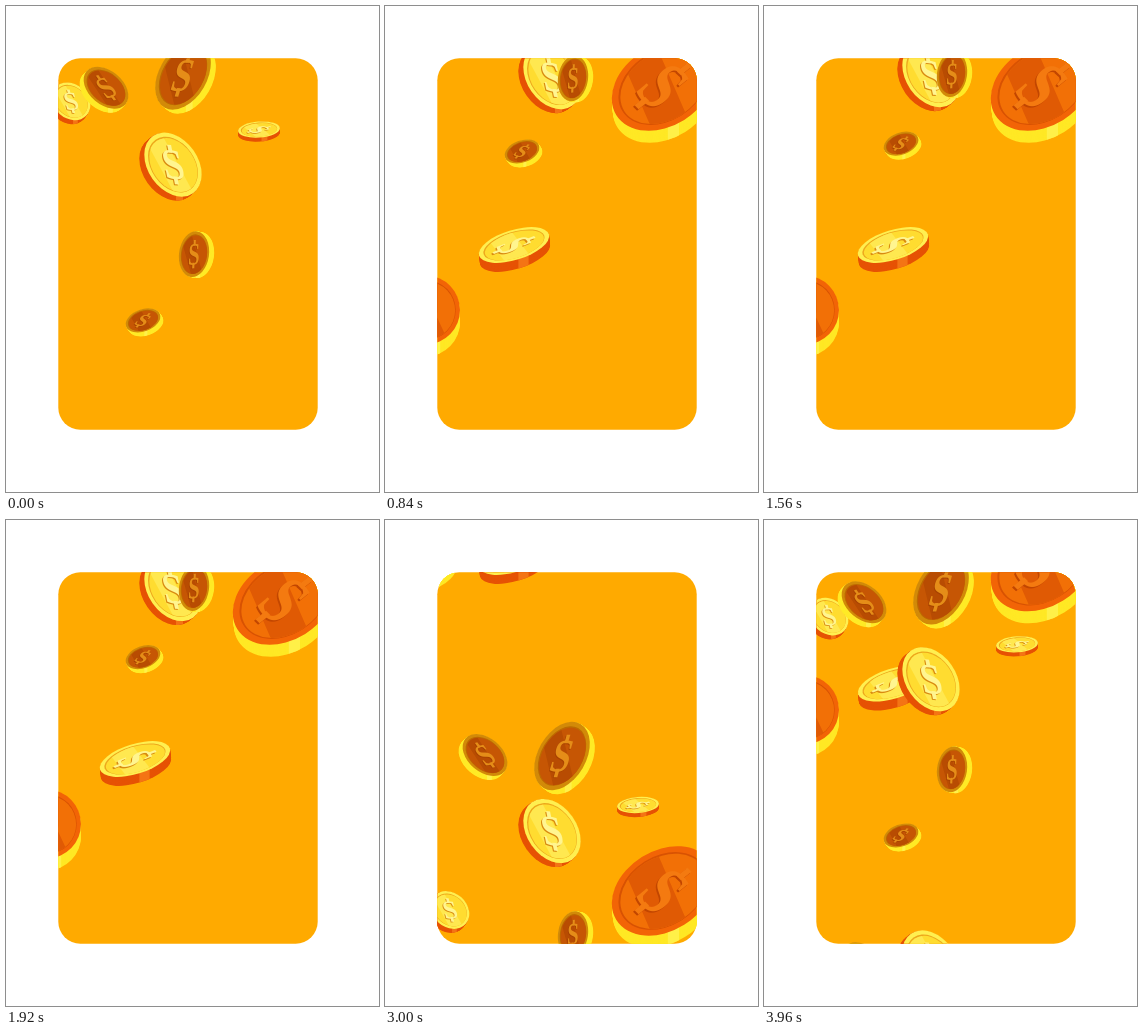
An HTML page with a canvas that plays this animation: 373x486 px, repeating every 4 s.

```html
<!DOCTYPE html>
<html lang="en">
<head>
<meta charset="utf-8">
<title>Drifting coins</title>
<style>
  html, body { margin: 0; width: 100%; height: 100%; overflow: hidden; background: #fff; }
  canvas { display: block; }
</style>
</head>
<body>
<canvas id="stage"></canvas>
<script>
const W = 373, H = 486, LOOP = 4000;
const canvas = document.getElementById('stage');
const ctx = canvas.getContext('2d');
const ratio = window.devicePixelRatio || 1;
canvas.width = W * ratio;
canvas.height = H * ratio;
canvas.style.width = W + 'px';
canvas.style.height = H + 'px';

const palettes = {
  gold: { side: '#e65204', glint: '#f47414', rim: '#ffef50', line: '#eda81c', inner: '#ffdc30', band: '#ffe850', sign: '#fff590', shade: '#d98a10' },
  dark: { side: '#ffea26', glint: '#fff04a', rim: '#d28a08', line: '#bd6a00', inner: '#c65604', band: '#b84c02', sign: '#e58d18', shade: '#a84200' },
  fire: { side: '#ffe824', glint: '#fff048', rim: '#f26406', line: '#d85202', inner: '#f27006', band: '#e05a04', sign: '#f47a10', shade: '#c24600' }
};

// Face offset (dx, dy) from the coin's anchor, radii, tilt, edge depth, sign spin.
const coin = (look, x, dx, dy, rx, ry, tilt, ex, ey, spin) =>
  ({ look: palettes[look], x: x + dx, dy, rx, ry, tilt: tilt * Math.PI / 180, ex, ey, spin: spin * Math.PI / 180 });

const coins = {
  A: coin('gold', 66, -1, 0, 17, 21, -48, -3, 4, -8),
  B: coin('dark', 99, 1, -2, 17, 25.5, -50, -4, 4, -30),
  C: coin('dark', 179, -2, -2, 24, 37, 30, 5, 4, 10),
  D: coin('gold', 253, 0, -2, 21, 8, -4, 0, 4, 60),
  E: coin('gold', 165, 2, -4, 25, 35, -35, -5, 4, -4),
  F: coin('dark', 190, -2, -1, 15, 23, 8, 5, 1, 0),
  G: coin('dark', 138, -1, -2, 11, 18, 70, 3, 4, 30),
  H: coin('fire', 270, 8, -15, 40, 55, 58, 1, 12, 48),
  I: coin('gold', 130, -1, -4, 36.5, 15, -17, 1, 9, 62),
  J: coin('fire', 42, 0, -6, 33, 34, 0, 0, 12, 0)
};

// Each move: coin, from y, to y, settling time in ms. Order is back to front.
const phases = [
  { start: 0, moves: [
    ['I', 640, 243, 75], ['J', 700, 310, 75], ['H', 520, 95, 75],
    ['A', 96, -60, 226], ['B', 84, 27, 226], ['C', 72, -60, 226], ['D', 126, 20, 226],
    ['E', 163, 73, 226], ['F', 250, 69, 226], ['G', 317, 139, 276]
  ] },
  { start: 1940, moves: [
    ['I', 243, 41, 60], ['J', 310, 29, 60], ['H', 95, -230, 60],
    ['B', 27, -120, 60], ['E', 73, -170, 60], ['F', 69, -270, 60], ['G', 139, -100, 60],
    ['A', 684, 390, 60], ['B', 572, 237, 60], ['C', 574, 238, 60], ['D', 500, 287, 60],
    ['E', 526, 315, 60], ['F', 700, 415, 60], ['H', 700, 385, 182]
  ] },
  { start: 3760, moves: [
    ['I', 41, -100, 32], ['J', 29, -150, 32], ['I', 520, 167, 32], ['J', 580, 195, 32],
    ['H', 385, 61, 32], ['A', 390, 96, 32], ['B', 237, 84, 32], ['C', 238, 72, 32],
    ['D', 287, 126, 32], ['E', 315, 163, 32], ['F', 415, 250, 32], ['G', 560, 317, 32],
    ['B', 600, 445, 32], ['E', 640, 446, 32]
  ] }
];

function disc(c, x, y, scale, fill) {
  ctx.beginPath();
  ctx.ellipse(x, y, c.rx * scale, c.ry * scale, c.tilt, 0, Math.PI * 2);
  ctx.fillStyle = fill;
  ctx.fill();
}

// Unit circle of the tilted face, turned back by the tilt plus a spin.
function enterFace(c, x, y, spin) {
  ctx.translate(x, y);
  ctx.rotate(c.tilt);
  ctx.scale(c.rx, c.ry);
  ctx.rotate(spin - c.tilt);
}

// A dollar sign whose bar shows only above and below the S.
function drawGlyph(c, x, y, fill) {
  ctx.save();
  enterFace(c, x, y, c.spin);
  ctx.scale(0.0155, 0.0155);
  ctx.font = 'bold 88px "Liberation Serif", serif';
  ctx.textAlign = 'center';
  ctx.fillStyle = fill;
  ctx.fillText('S', 0, 29);
  ctx.fillRect(-4, -40, 9, 16);
  ctx.fillRect(-5, 24, 9, 16);
  ctx.restore();
}

function drawCoin(c, anchor) {
  const y = anchor + c.dy, look = c.look;
  if (y < -60 || y > H + 60) return;

  for (let i = 12; i > 0; i--) disc(c, c.x + c.ex * i / 12, y + c.ey * i / 12, 1, look.side);

  // Glint across the edge
  ctx.save();
  ctx.beginPath();
  ctx.ellipse(c.x + c.ex, y + c.ey, c.rx, c.ry, c.tilt, 0, Math.PI * 2);
  ctx.clip();
  ctx.fillStyle = look.glint;
  ctx.fillRect(c.x + c.rx * 0.12, y, c.rx * 0.28, c.ry + 20);
  ctx.restore();

  disc(c, c.x, y, 1, look.rim);
  disc(c, c.x, y, 0.87, look.line);
  disc(c, c.x + 0.4, y + 0.4, 0.84, look.inner);

  // Broad diagonal reflection on the face
  ctx.save();
  ctx.beginPath();
  ctx.ellipse(c.x + 0.4, y + 0.4, c.rx * 0.84, c.ry * 0.84, c.tilt, 0, Math.PI * 2);
  ctx.clip();
  enterFace(c, c.x, y, -0.45);
  ctx.fillStyle = look.band;
  ctx.fillRect(-0.5, -1, 0.68, 2);
  ctx.restore();

  const lift = Math.max(0.7, c.rx / 26);
  drawGlyph(c, c.x - lift, y + lift, look.shade);
  drawGlyph(c, c.x, y, look.sign);
}

function draw(t) {
  ctx.setTransform(ratio, 0, 0, ratio, 0, 0);
  ctx.fillStyle = '#fff';
  ctx.fillRect(0, 0, W, H);
  ctx.save();
  ctx.beginPath();
  ctx.roundRect(52.3, 52.3, 259.4, 371.4, 22);
  ctx.fillStyle = '#ffaa00';
  ctx.fill();
  ctx.clip();
  const phase = phases.filter(p => t >= p.start).pop();
  for (const [name, from, to, settle] of phase.moves) {
    drawCoin(coins[name], to + (from - to) * Math.exp((phase.start - t) / settle));
  }
  ctx.restore();
}

const begin = performance.now();
function tick() {
  draw((performance.now() - begin) % LOOP);
  requestAnimationFrame(tick);
}
tick();
</script>
</body>
</html>
```
